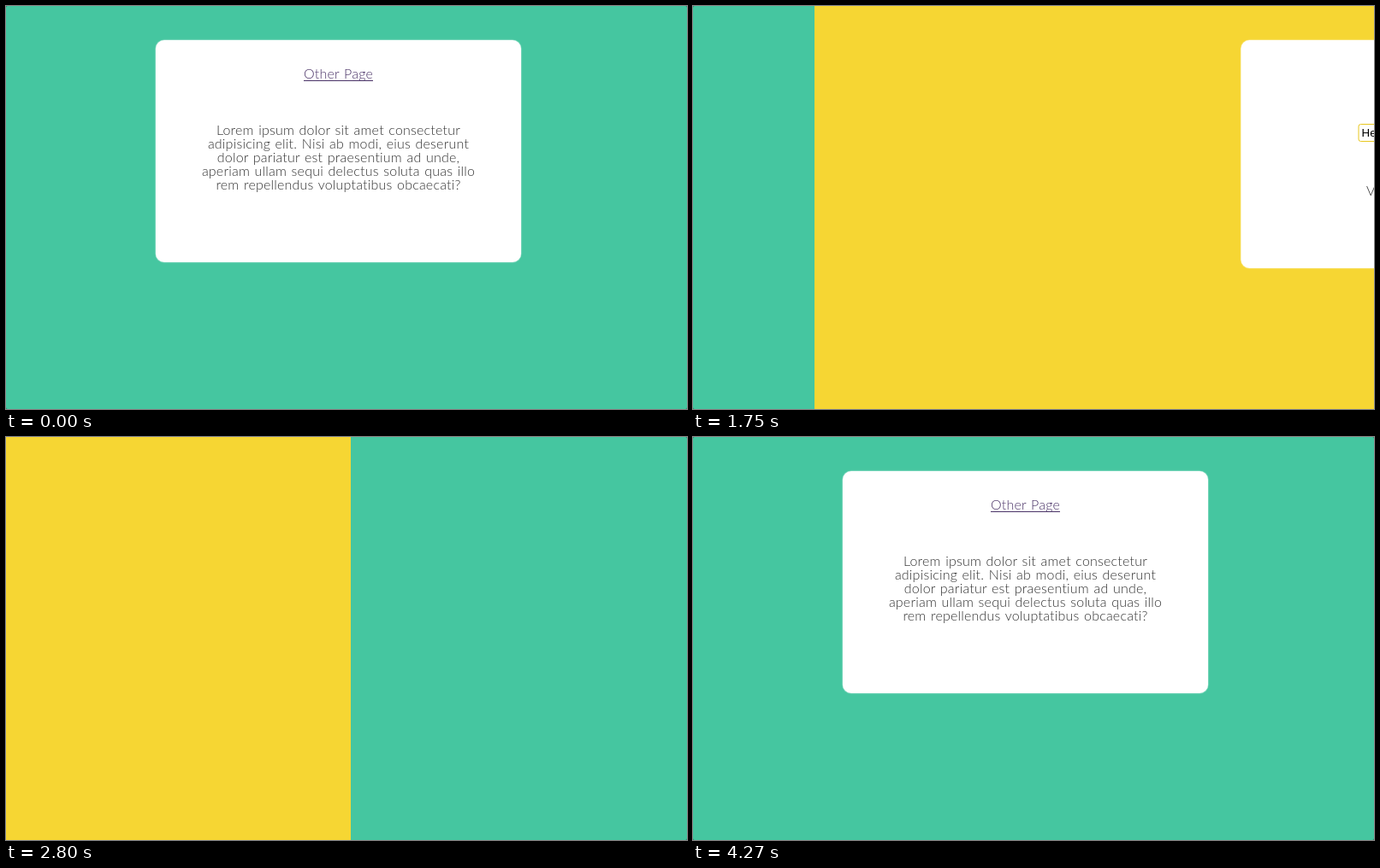
These frames come from a looping animation (796x472 px, 4.48 s). An HTML page:

```html
<!DOCTYPE html>
<html lang="en">
<head>
<meta charset="utf-8">
<title>Page transition</title>
<style>
  html, body { margin: 0; width: 100%; height: 100%; overflow: hidden; background: #2b7d66; }
  #stage { position: relative; width: 796px; height: 472px; overflow: hidden; }
  #green, #yellow { position: absolute; inset: 0; }
  #green { background: #45c6a0; border-radius: 2px; }
  #yellow { background: #f6d633; }
  .card {
    position: absolute; left: 175px; top: 40px; width: 427px; height: 260px;
    border-radius: 10px; background: #fff; color: #333; text-align: center;
    box-shadow: 0 0 1px .5px rgba(255, 255, 255, .5);
    font: 300 16px/16px Lato, "Open Sans", sans-serif;
    letter-spacing: .2px; word-spacing: 1px; white-space: nowrap;
  }
  #other { height: 267px; }
  .card > * { position: absolute; left: 0; right: 0; }
  .link { top: 31px; color: #4b3468; }
  .link span {
    text-decoration: underline 1px; text-underline-offset: 2px; text-decoration-skip-ink: none;
  }
  #other .link { color: #e9b32e; }
  .copy { top: 97px; }
  .field {
    left: 137px; right: auto; top: 98px; width: 148px; height: 19px; padding-left: 3px;
    border: 1px solid #e8c71f; border-radius: 3px; color: #000; text-align: left;
    font: 13.333px/19px "Liberation Sans", Arial, sans-serif;
    letter-spacing: 0; word-spacing: 0;
  }
  .value { top: 168px; }
</style>
</head>
<body>
<div id="stage">
  <div id="green"></div>
  <div id="yellow"></div>
  <div class="card" id="home">
    <div class="link"><span>Other Page</span></div>
    <div class="copy">
      Lorem ipsum dolor sit amet consectetur<br>
      adipisicing elit. Nisi ab modi, eius deserunt<br>
      dolor pariatur est praesentium ad unde,<br>
      aperiam ullam sequi delectus soluta quas illo<br>
      rem repellendus voluptatibus obcaecati?
    </div>
  </div>
  <div class="card" id="other">
    <div class="link"><span>Home</span></div>
    <div class="field">Hello World</div>
    <div class="value">Value: Hello World</div>
  </div>
</div>
<script>
  const W = 796, LOOP = 4480, STEP = 70;
  const TO_OTHER = 1320, TO_HOME = 2520; // start of each page change
  const [yellow, home, other] = ['yellow', 'home', 'other'].map(id => document.getElementById(id));

  const progress = (t, start, length) => Math.min(1, Math.max(0, (t - start) / length));

  // cubic-bezier(.42, 0, 1, 1)
  function easeIn(x) {
    let lo = 0, hi = 1;
    for (let i = 0; i < 30; i++) {
      const s = (lo + hi) / 2, r = 1 - s;
      if (1.26 * s * r * r + 3 * s * s * r + s ** 3 < x) lo = s; else hi = s;
    }
    return lo * lo * (3 - 2 * lo);
  }

  // Offsets in px, t counted from the start of the page change
  const leave = t => -W * easeIn(progress(t, 12.4, 310));
  const enter = t => W * easeIn(1 - progress(t, 283, 530));
  const edge = t => W * (1 - progress(t, 150, 640)) ** 3;

  const slide = (el, x) => { el.style.transform = `translateX(${x}px)`; };

  function draw(t) {
    const a = t - TO_OTHER, b = t - TO_HOME;
    yellow.style.left = edge(a) + 'px';
    yellow.style.right = W - edge(b) + 'px';
    slide(home, b < 0 ? leave(a) : enter(b));
    slide(other, enter(a) + leave(b));
  }

  const start = performance.now();
  function tick() {
    const t = (performance.now() - start) % LOOP;
    draw(Math.floor(t / STEP) * STEP);
    requestAnimationFrame(tick);
  }
  tick();
</script>
</body>
</html>
```
